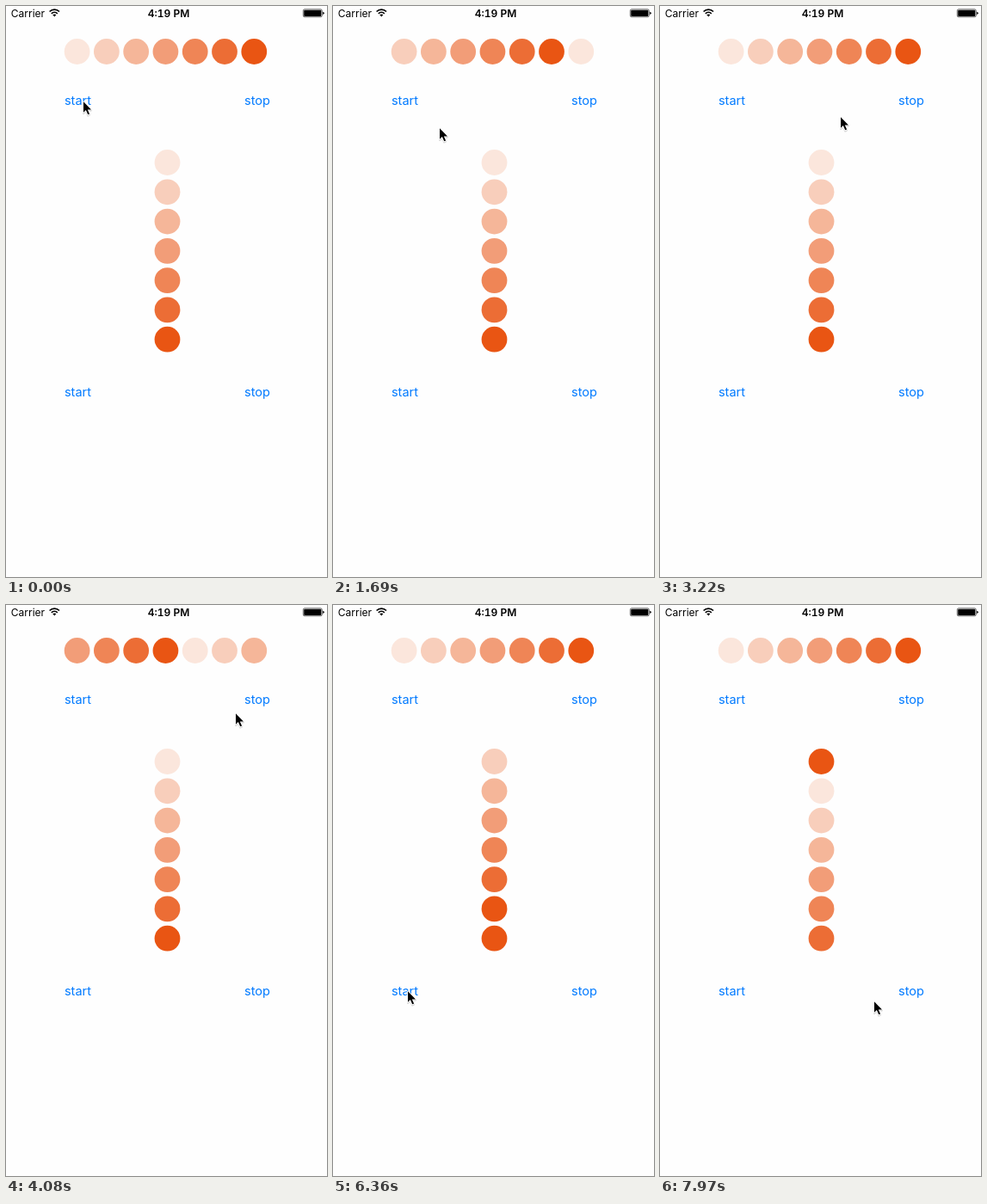
An HTML page that plays this animation: 373x664 px, repeating every 8 s.

```html
<!DOCTYPE html>
<html lang="en">
<head>
<meta charset="utf-8">
<title>Dot loaders</title>
<style>
  html, body { margin: 0; width: 100%; height: 100%; overflow: hidden; background: #fefefe; }
  svg { display: block; width: 100vw; height: 100vh; }
  text { font-family: Inter, Roboto, sans-serif; }
  .button { font-size: 14.5px; fill: #007aff; text-anchor: middle; }
  .status { font-size: 12px; }
  .clock { font-weight: 600; text-anchor: middle; font-variant-numeric: tabular-nums; }
</style>
</head>
<body>
<svg viewBox="0 0 373 664">
  <rect width="373" height="664" fill="#fefefe"/>
  <text class="status" x="5.8" y="12.6">Carrier</text>
  <g fill="none" stroke="#000" stroke-width="1.7">
    <path d="M50.6 6.5a8.2 8.2 0 0 1 11.4 0M52.8 8.8a5.1 5.1 0 0 1 7 0"/>
    <path d="M54.3 10.3a3 3 0 0 1 4 0L56.3 12.6Z" fill="#000" stroke="none"/>
  </g>
  <text class="status clock" x="189" y="12.6">4:19 PM</text>
  <rect x="345.3" y="3.8" width="22" height="9" rx="1.8" fill="none" stroke="#000" stroke-width=".6"/>
  <rect x="346.2" y="4.7" width="20.2" height="7.2" rx="1"/>
  <path d="M368.2 6.7q1.5.3 1.5 1.6t-1.5 1.6Z"/>

  <g id="dots"></g>

  <text class="button" id="startTop" x="83.5" y="114.7">start</text>
  <text class="button" id="stopTop" x="292" y="114.7">stop</text>
  <text class="button" id="startBottom" x="83.5" y="453.7">start</text>
  <text class="button" x="292" y="453.7">stop</text>

  <g id="cursor" stroke-linejoin="round">
    <path d="M1 2.6V15l2.9-2.7 2.3 5.2 1.9-.8-2.3-5.1h4.2Z" fill="#000" stroke="#000" stroke-width="2" opacity=".16"/>
    <path d="M1 1.3V13.8l2.9-2.7 2.3 5.2 1.9-.8-2.3-5.1h4.2Z" fill="#000" stroke="#fff" stroke-width="1.8" paint-order="stroke"/>
  </g>
</svg>
<script>
const LOOP = 8000, COUNT = 7, GAP = 34.28;
const $ = id => document.getElementById(id);

// Orange mixed into white, from palest to full.
const shades = Array.from({ length: COUNT }, (_, i) => {
  const mix = c => Math.round(254 + (c - 254) * (i + 1) / COUNT);
  return `rgb(${[233, 85, 19].map(mix)})`;
});

function makeDots(x, y, dx, dy) {
  return shades.map((_, i) => {
    const dot = document.createElementNS('http://www.w3.org/2000/svg', 'circle');
    dot.setAttribute('cx', x + dx * i);
    dot.setAttribute('cy', y + dy * i);
    dot.setAttribute('r', 14.9);
    return $('dots').appendChild(dot);
  });
}
const row = makeDots(82.6, 53, GAP, 0);
const column = makeDots(187.5, 182, 0, GAP);

// [time, x, y, eased]: pointer tip positions
const route = [
  [540, 89, 110], [690, 85, 110], [840, 85, 110], [870, 84, 110],
  [1200, 84, 110], [1290, 89, 121], [1450, 106, 147], [1560, 116, 146],
  [1690, 123, 141], [1780, 123, 141], [1970, 139, 142], [2350, 167, 137],
  [2530, 167, 137], [2560, 168, 136], [3220, 209, 128], [3490, 209, 128],
  [4080, 266, 125], [4290, 278, 115], [4400, 284, 109], [4500, 284, 109],
  [5030, 166, 325, true], [5170, 166, 325], [5920, 86, 448, true],
  [7250, 86, 448], [7970, 248, 460, true]
];

function pointerAt(t) {
  const next = route.findIndex(p => p[0] > t);
  if (next === 0) return route[0].slice(1, 3);
  if (next < 0) return route[route.length - 1].slice(1, 3);
  const [t0, x0, y0] = route[next - 1], [t1, x1, y1, eased] = route[next];
  let k = (t - t0) / (t1 - t0);
  if (eased) k = k * k * (3 - 2 * k);
  return [x0 + (x1 - x0) * k, y0 + (y1 - y0) * k];
}

const ticks = (t, first, period) => Math.max(0, Math.floor((t - first) / period) + 1);

function paint(dots, shiftOf) {
  dots.forEach((dot, i) => dot.setAttribute('fill', shades[(i + shiftOf(i)) % COUNT]));
}

// A pressed button dims at once and fades back after release.
function pressOpacity(t, down, up) {
  if (t < down) return 1;
  return t < up ? 0.2 : Math.min(1, 0.2 + 0.8 * (t - up) / 220);
}

function render(t) {
  const rowShift = t < 4480 ? ticks(t, 1489, 286.6) : 0;
  paint(row, () => rowShift);
  // The lowest dot follows the others a moment later.
  paint(column, i => ticks(i === COUNT - 1 ? t - 28 : t, 6358, 304));

  $('startTop').setAttribute('opacity', pressOpacity(t, 1168, 1203));
  $('stopTop').setAttribute('opacity', pressOpacity(t, 4430, 4480));
  $('startBottom').setAttribute('opacity', pressOpacity(t, 5960, 6020));

  const [x, y] = pointerAt(t).map(Math.round);
  $('cursor').setAttribute('transform', `translate(${x} ${y})`);
}

const began = performance.now();
function frame() {
  render((performance.now() - began) % LOOP);
  requestAnimationFrame(frame);
}
frame();
</script>
</body>
</html>
```
